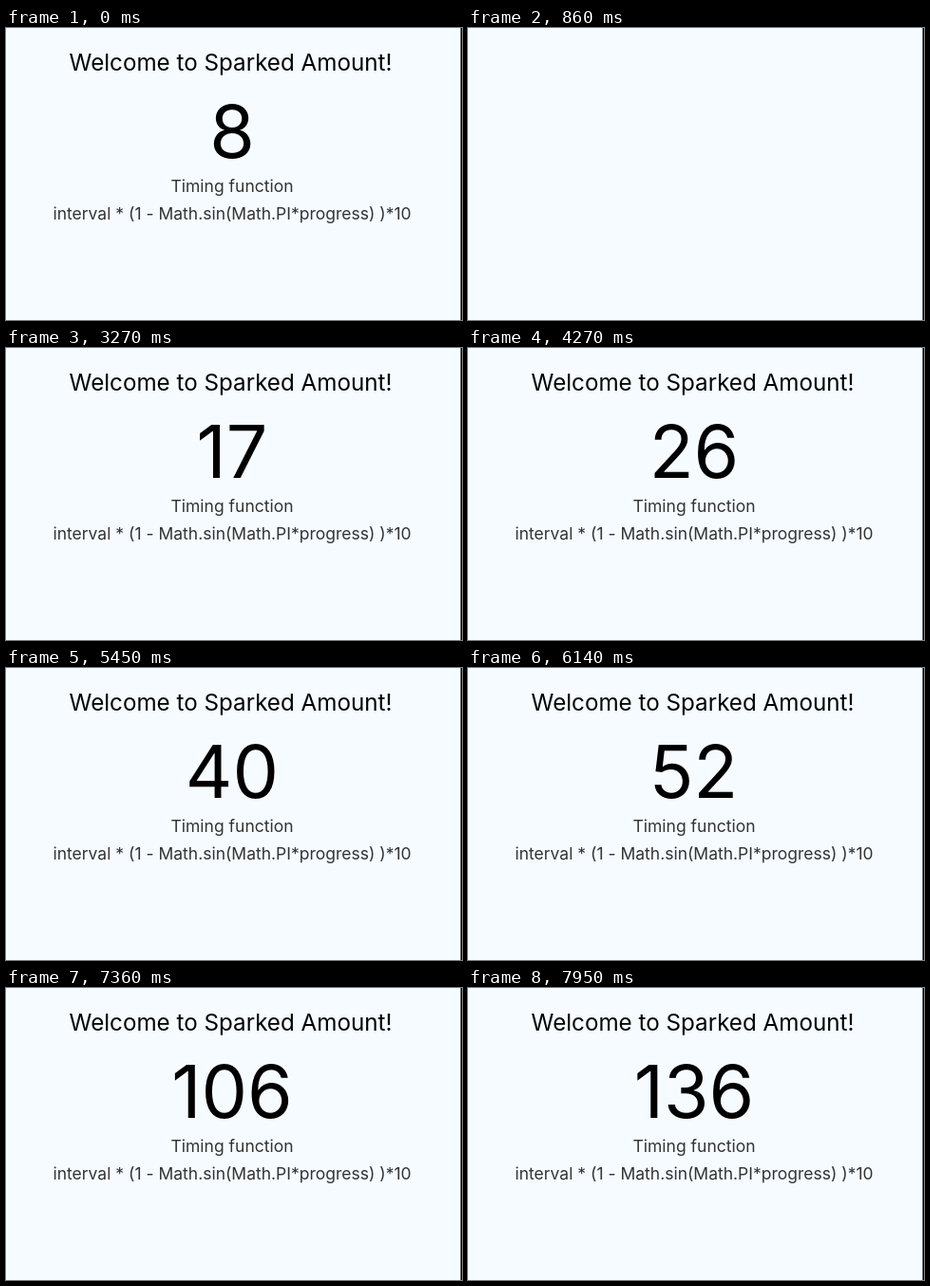
These frames come from a looping animation (480x308 px, 8 s). An HTML page:

```html
<!DOCTYPE html>
<html lang="en">
<head>
<meta charset="utf-8">
<title>Counter</title>
<style>
  html, body { margin: 0; width: 100%; height: 100%; overflow: hidden; background: #f5fbff; }
  svg { display: block; width: 480px; height: 308px; }
  text {
    font-family: Inter, "Liberation Sans", sans-serif;
    font-variant-ligatures: no-contextual;
    text-anchor: middle;
  }
  .title { font-size: 24.2px; }
  .number { font-size: 77px; }
  .note { font-size: 17.5px; fill: #333; }
</style>
</head>
<body>
<svg viewBox="0 0 480 308">
  <g id="content">
    <text class="title" x="236.5" y="45">Welcome to Sparked Amount!</text>
    <text class="number" id="number" x="238" y="137.4">8</text>
    <text class="note" x="238" y="173">Timing function</text>
    <text class="note" x="238" y="201.5">interval * (1 - Math.sin(Math.PI*progress) )*10</text>
  </g>
  <rect x="478.5" width="1.5" height="308"/>
</svg>
<script>
const LOOP = 8000, STEP = 1000 / 22;
const HIDE = 636, SHOW = 1090;
const OLD_COUNT = 8, COUNT_START = 984.6, TARGET = 200;
const INTERVAL = 14.1, OVERHEAD = 11.1;

const content = document.getElementById("content");
const number = document.getElementById("number");

// Waiting time before the next count, as in the formula on screen
const delay = count => INTERVAL * (1 - Math.sin(Math.PI * count / TARGET)) * 10 + OVERHEAD;

function countAt(time) {
  let count = 0;
  for (let next = COUNT_START + delay(0); next <= time; next += delay(count)) count++;
  return count;
}

function draw(elapsed) {
  // The display refreshes 22 times a second
  const time = Math.floor((elapsed % LOOP + 5) / STEP) * STEP;
  const hidden = time >= HIDE && time < SHOW;
  content.style.visibility = hidden ? "hidden" : "visible";
  number.textContent = time < SHOW ? OLD_COUNT : countAt(time);
}

let start;
function tick(now) {
  start ??= now;
  draw(now - start);
  requestAnimationFrame(tick);
}
requestAnimationFrame(tick);
</script>
</body>
</html>
```
